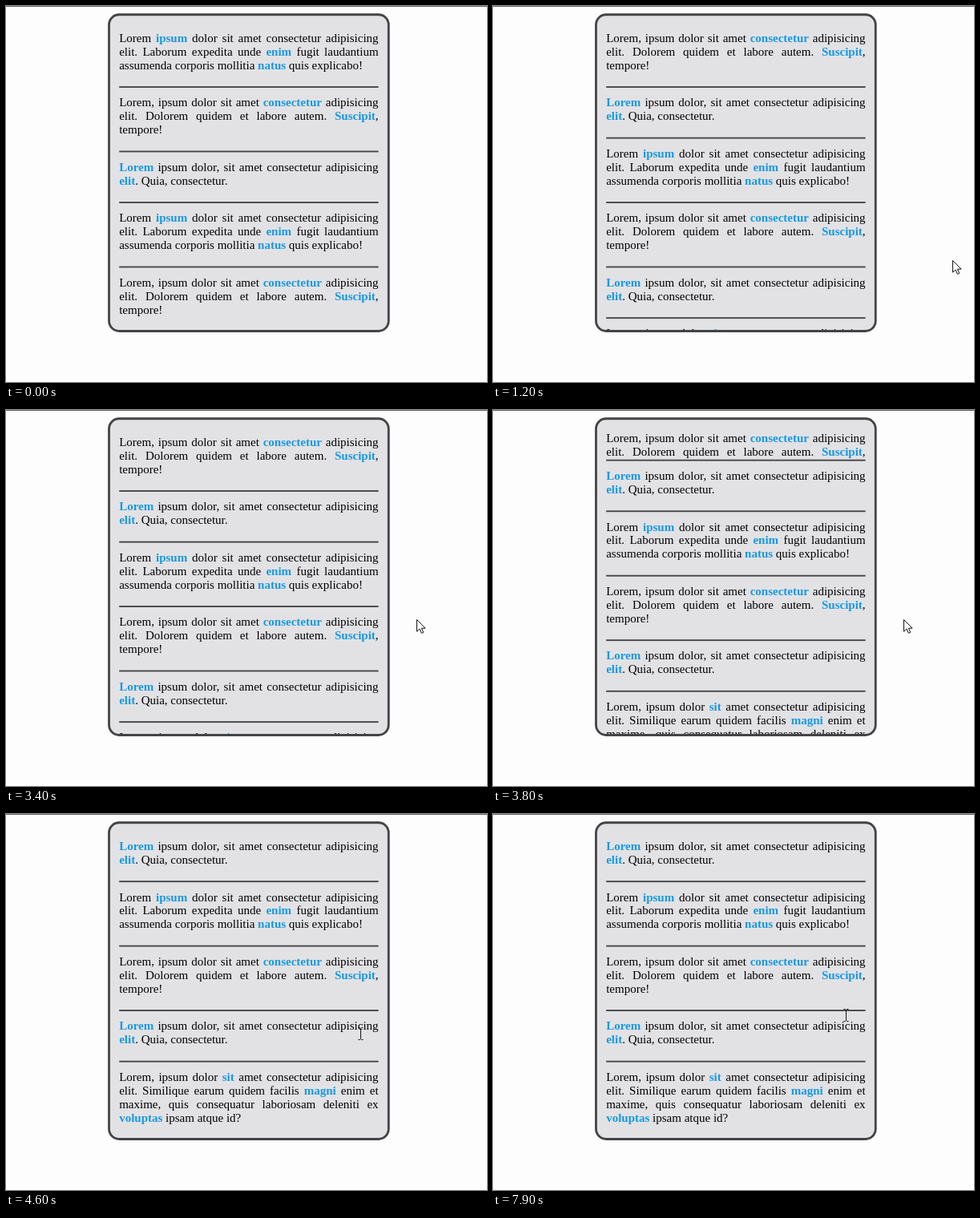
An HTML page for the animation above (8000 ms loop, 600 by 469 pixels).

```html
<!DOCTYPE html>
<html lang="en">
<head>
<meta charset="utf-8">
<title>News ticker</title>
<style>
  html, body { margin: 0; width: 100%; height: 100%; overflow: hidden; background: #fefdfe; }
  body { position: relative; }
  #edge { position: absolute; left: 0; top: 0; width: 100%; height: 1px; background: #626265; }
  #page { position: absolute; left: 0; top: 0; width: 640px; height: 500px; transform: translate(-.4px, 0) scale(.9375, .9354); transform-origin: 0 0; }
  #ticker {
    position: absolute; left: 136px; top: 10px; width: 345px; height: 409px;
    margin: 0; padding: 10px 12px 0; overflow: hidden; list-style: none;
    border: 3px solid #444447; border-radius: 15px; background: #e2e2e5;
    font: 16px/18px "Liberation Serif", "Times New Roman", serif; color: #000; text-align: justify;
  }
  #ticker li { padding: 10px 0 20px; border-bottom: 2px solid #444447; overflow: hidden; }
  #ticker span { position: relative; top: 1px; }
  b { color: #1898e2; }
  svg { position: absolute; left: 0; top: 0; width: 24px; height: 24px; overflow: visible; }
</style>
</head>
<body>
<div id="edge"></div>
<div id="page"><ul id="ticker"></ul></div>
<svg id="cursor">
  <path id="arrow" d="M.5.5V15.2L4 12L6.4 17.4L8.7 16.4L6.4 11.2H11Z" fill="#fff" stroke="#111" stroke-width="1"/>
  <path id="beam" d="M-2.5-7.5H-.5L.5-6.5L1.5-7.5H3.5M.5-6.5V6.5M-2.5 7.5H-.5L.5 6.5L1.5 7.5H3.5" fill="none" stroke="#111" stroke-width="1"/>
</svg>
<script>
const LOOP = 8000, SLIDE = 500;
const PAD_TOP = 10, PAD_BOTTOM = 20, TEXT_HEIGHT = 54;
const slideStarts = [538, 3555];

const laborum = 'Lorem <b>ipsum</b> dolor sit amet consectetur adipisicing elit. Laborum expedita unde <b>enim</b> fugit laudantium assumenda corporis mollitia <b>natus</b> quis explicabo!';
const dolorem = 'Lorem, ipsum dolor sit amet <b>consectetur</b> adipisicing elit. Dolorem quidem et labore autem. <b>Suscipit</b>, tempore!';
const quia = '<b>Lorem</b> ipsum dolor, sit amet consectetur adipisicing <b>elit</b>. Quia, consectetur.';
const similique = 'Lorem, ipsum dolor <b>sit</b> amet consectetur adipisicing elit. Similique earum quidem facilis <b>magni</b> enim et maxime, quis consequatur laboriosam deleniti ex <b>voluptas</b> ipsam atque id?';

// Pointer path: time, x, y
const path = [
  [1000, 604, 336], [1200, 573, 317], [1800, 553, 299], [2500, 512, 261],
  [3850, 512, 261], [4450, 442, 274], [5500, 442, 274], [5900, 440, 251]
];

const byId = id => document.getElementById(id);
const ticker = byId('ticker'), cursor = byId('cursor'), arrow = byId('arrow'), beam = byId('beam');
ticker.innerHTML = [laborum, dolorem, quia, laborum, dolorem, quia, similique]
  .map(text => `<li><span>${text}</span></li>`).join('');
const items = [...ticker.children];

const clamp = v => Math.min(1, Math.max(0, v));

function slideUp(item, progress) {
  const left = .5 + Math.cos(Math.PI * progress) / 2;
  item.style.display = progress < 1 ? '' : 'none';
  item.style.height = TEXT_HEIGHT * left + 'px';
  item.style.paddingTop = PAD_TOP * left + 'px';
  item.style.paddingBottom = PAD_BOTTOM * left + 'px';
}

function pointerAt(t) {
  const next = path.findIndex(point => point[0] > t);
  if (next < 0) return path[path.length - 1].slice(1);
  const [t0, x0, y0] = path[next - 1], [t1, x1, y1] = path[next];
  const k = (t - t0) / (t1 - t0);
  return [Math.round(x0 + (x1 - x0) * k), Math.round(y0 + (y1 - y0) * k)];
}

function render(t) {
  slideStarts.forEach((start, i) => slideUp(items[i], clamp((t - start) / SLIDE)));
  const visible = t >= path[0][0];
  cursor.style.display = visible ? '' : 'none';
  if (!visible) return;
  const [x, y] = pointerAt(t), overText = x < 464;
  cursor.style.transform = `translate(${x}px, ${y}px)`;
  arrow.style.display = overText ? 'none' : '';
  beam.style.display = overText ? '' : 'none';
}

const begin = performance.now();
function tick() {
  render((performance.now() - begin) % LOOP);
  requestAnimationFrame(tick);
}
tick();
</script>
</body>
</html>
```
